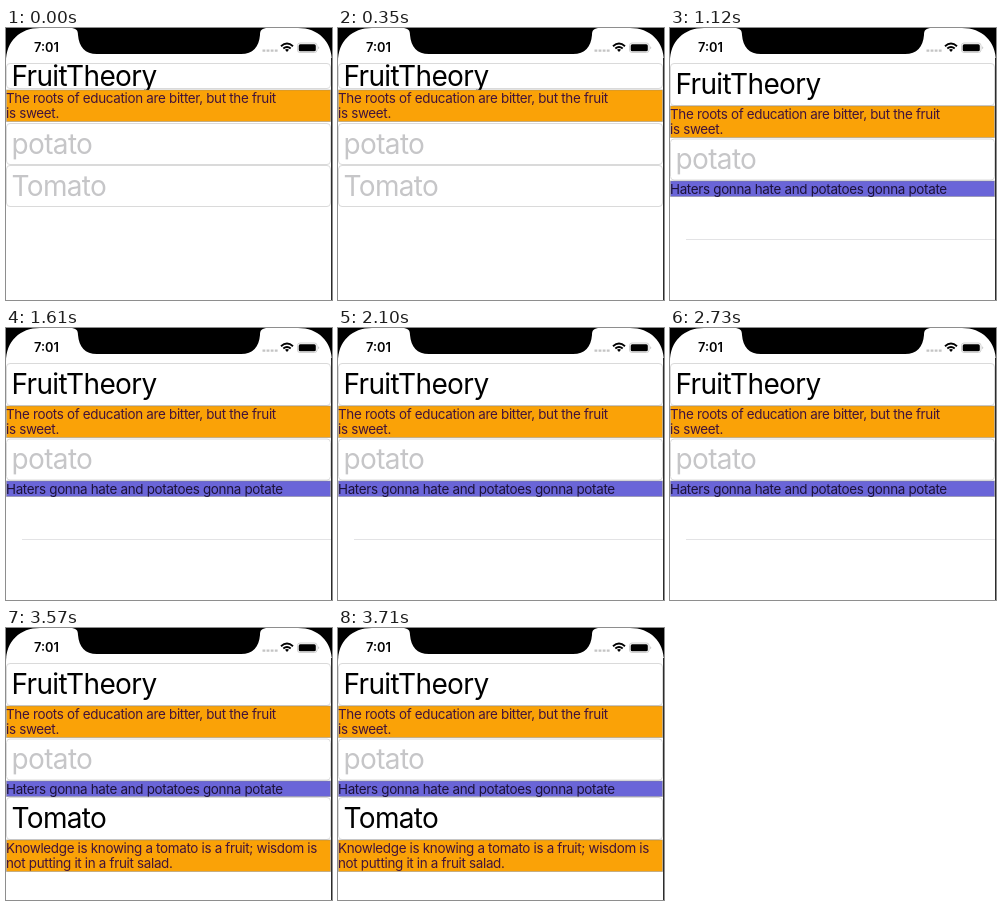
Write an HTML page that moves like this. It is 326 px wide and 272 px high and loops after 4130 ms.

```html
<!DOCTYPE html>
<html lang="en">
<head>
<meta charset="utf-8">
<style>
html, body { margin: 0; width: 100%; height: 100%; overflow: hidden; background: #fff; }
svg { display: block; }
text { font-family: Inter, sans-serif; letter-spacing: -0.023em; }
.title { font-size: 28px; }
.quote { font-size: 13.4px; }
.clock { font-size: 12.8px; font-weight: 600; letter-spacing: 0; }
</style>
</head>
<body>
<svg width="326" height="272" viewBox="0 0 326 272">
  <rect width="326" height="272" fill="#fff"/>
  <g id="list"></g>
  <path d="M325.5 30V272" stroke="#2c2c2c"/>
  <path d="M0 0H34C14 0 0 13 0 34ZM326 0H292C312 0 326 13 326 34ZM64 0C70 0 72 2 72 7C73 19 79 26 91 26H235C247 26 253 19 254 7C254 2 256 0 262 0Z"/>
  <text class="clock" x="28" y="24">7:01</text>
  <path d="M256.500 22.700H272" stroke="#c4c4c4" stroke-width="2.300" stroke-dasharray="2.800 1.300"/>
  <g fill="none" stroke="#000" stroke-width="1.900">
    <path d="M275 18.200Q281 12.800 287 18.200M277.300 20.500Q281 17.300 284.700 20.500"/>
    <path d="M279 21.700L281 24L283 21.700Q281 20.300 279 21.700Z" fill="#000" stroke="none"/>
  </g>
  <rect x="291.500" y="15" width="19.500" height="9.500" rx="2.500" fill="none" stroke="#d0d0d0"/>
  <rect x="292.700" y="16.200" width="17.100" height="7.100" rx="1.500"/>
  <path d="M312.300 18.200Q314.200 19.700 312.300 21.300Z" fill="#bbb"/>
</svg>
<script>
const LOOP = 4130, OPEN_SECOND = 420, OPEN_THIRD = 3570;
const ORANGE = '#faa207', VIOLET = '#6a65d8';
const INK = '#000', FADED = '#c6c6c8';

const field = (y, height, label, color) => `
  <rect x=".5" y="${y + .5}" width="324" height="${height - 1}" rx="3.5" fill="#fff" stroke="#dadada"/>
  <text class="title" x="5.5" y="${y + height / 2 + 9.8}" fill="${color}">${label}</text>`;

const quote = (y, color, ink, ...lines) => `
  <rect x=".5" y="${y + .5}" width="324" height="${lines.length * 16 - .5}"
    fill="${color}" stroke="#808080" stroke-opacity=".45"/>` +
  lines.map((line, i) =>
    `<text class="quote" x="0" y="${y + 13.2 + i * 15.7}" fill="${ink}">${line}</text>`).join('');

const fruitQuote = y => quote(y, ORANGE, '#42133a',
  'The roots of education are bitter, but the fruit', 'is sweet.');

const collapsed =
  field(35, 26, 'FruitTheory', INK) + fruitQuote(61.5) +
  field(95, 42, 'potato', FADED) + field(137, 42, 'Tomato', FADED);

const twoOpen =
  field(35, 43, 'FruitTheory', INK) + fruitQuote(77.5) +
  field(110.5, 42, 'potato', FADED) +
  quote(152.500, VIOLET, '#1c1238', 'Haters gonna hate and potatoes gonna potate');

const separator = '<path d="M16 211.500H325" stroke="#e3e3e5"/>';

const allOpen = twoOpen +
  field(169, 43, 'Tomato', INK) +
  quote(211.5, ORANGE, '#42133a',
    'Knowledge is knowing a tomato is a fruit; wisdom is', 'not putting it in a fruit salad.');

const list = document.getElementById('list');
let shown;

function draw() {
  const t = performance.now() % LOOP;
  const view = t < OPEN_SECOND ? collapsed : t < OPEN_THIRD ? twoOpen + separator : allOpen;
  if (view !== shown) list.innerHTML = shown = view;
  requestAnimationFrame(draw);
}
draw();
</script>
</body>
</html>
```
